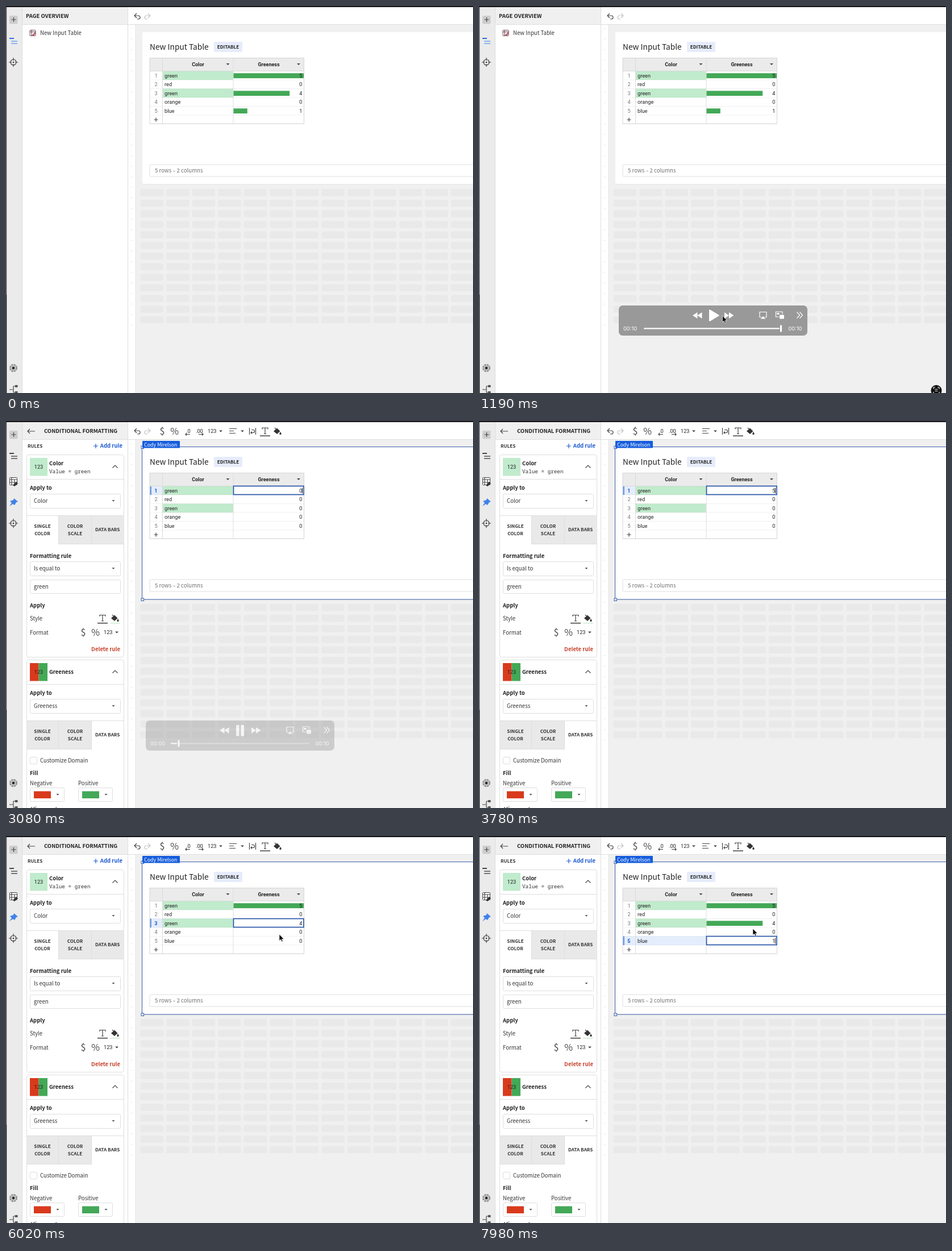
Recreate the animation shown at these times as an HTML page. Size 822 by 681 pixels, loop 8 s.

```html
<!DOCTYPE html>
<html lang="en">
<head>
<meta charset="utf-8">
<title>Conditional formatting</title>
<style>
html, body { margin: 0; width: 100%; height: 100%; overflow: hidden; background: #f0f0f0; }
svg { display: block; width: 822px; height: 681px; }
text { font: 9.65px "Noto Sans CJK JP", "Noto Sans CJK SC", "Noto Sans CJK", sans-serif; fill: #333; white-space: pre; }
.b { font-weight: 700; font-size: 9.5px; fill: #222; }
.s { font-weight: 700; font-size: 8.15px; }
.m { text-anchor: middle; }
.e { text-anchor: end; }
.title { font-size: 13.7px; fill: #222; }
.cell { font: 9.2px Roboto, sans-serif; fill: #222; }
.head { font: 700 9px Roboto, sans-serif; fill: #222; text-anchor: middle; }
.mono { font: 9.3px "Noto Sans Mono", monospace; }
.time { font: 9.3px Inter, sans-serif; fill: #fff; }
.sign { font: 16px "Noto Sans CJK JP", "Noto Sans CJK", sans-serif; fill: #444; text-anchor: middle; }
.ln { fill: none; stroke: #444; stroke-width: 1.2; }
</style>
</head>
<body>
<svg id="stage" viewBox="0 0 822 681"></svg>
<script>
const GREEN = '#43a857', PALE = '#c0ebcc', BLUE = '#1f5bd0', RED = '#d93a1c', LINE = '#dedede';
const LOOP = 8000, STEP = 70, PLAY = 2590;

const text = (x, y, s, cls = '', more = '') => `<text x="${x}" y="${y}" class="${cls}" ${more}>${s}</text>`;
const rect = (x, y, w, h, fill, more = '') => `<rect x="${x}" y="${y}" width="${w}" height="${h}" fill="${fill}" ${more}/>`;
const box = (x, y, w, h, r = 1.5, stroke = LINE) => rect(x + .5, y + .5, w, h, '#fff', `rx="${r}" stroke="${stroke}"`);
const line = (d, more = '') => `<path class="ln" d="${d}" ${more}/>`;
const fill = (d, color = '#444') => `<path d="${d}" fill="${color}"/>`;
const caret = (x, y, r = 3) => fill(`M${x - r} ${y - r / 2}h${2 * r}l${-r} ${r}z`);
const group = (id, body) => `<g id="${id}">${body}</g>`;
const repeat = (n, f) => Array.from({ length: n }, (_, i) => f(i)).join('');

const target = y => `<circle cx="13" cy="${y}" r="5" class="ln"/><circle cx="13" cy="${y}" r="1.3" fill="#333"/>` +
  line(`M13 ${y - 8}v5M13 ${y + 3}v5M5 ${y}h5M16 ${y}h5`);
const bucket = (x, y) => fill(`M${x - 6} ${y}l6-5.5 5.5 5.5-5.5 5z`, '#333') + line(`M${x - 4} ${y - 6}l4 4`) +
  fill(`M${x + 6} ${y + 1}q3.5 5 0 5t0-5`, '#333');
const letterT = (x, y) => line(`M${x - 5} ${y - 3}v-2.5h10v2.5M${x} ${y - 5.5}v10.5M${x - 2} ${y + 5}h4`) +
  rect(x - 9, y + 8, 18, 1.3, '#222');
const bars = color => fill('M6 56h8v2h-8z', color[0]) + fill('M9 61h11v2h-11zM9 65h11v2h-11z', color[1]);

function frame() {
  return rect(0, 0, 822, 681, '#f0f0f0') +
    rect(0, 33, 228, 648, '#fff') + rect(0, 2, 28, 679, '#ebebeb') + rect(28, 2, 186, 30, '#f0f0f0') +
    rect(215, 2, 607, 30, '#fff') + rect(28, 32, 794, 1, LINE) + rect(28, 2, 1, 679, LINE) +
    rect(214, 2, 1, 679, LINE) + rect(227.5, 33, 1, 648, '#e4e4e4') +
    repeat(29, i => rect(220.5, 39 + i * 18.65, 1.2, 1.2, '#ccc')) +
    repeat(13, r => repeat(13, c => rect(236.5 + c * 45.55, 322 + r * 18.65, 40.5, 12.5, '#e9e9e9', 'rx="3"'))) +
    rect(0, 0, 822, 2, '#17151a') + rect(0, 2, 1.2, 506, '#55525a') + rect(0, 508, 1.2, 173, '#111') +
    rect(6, 17, 14.5, 14.5, '#cdcdcd', 'rx="2"') + line('M9.5 24h8M13.5 20v8') +
    `<circle cx="13" cy="637" r="5.5" fill="none" stroke="#8a8a8a" stroke-width="3" stroke-dasharray="3.2 1.12"/>
     <circle cx="13" cy="637" r="5" fill="#bbb"/><circle cx="13" cy="637" r="2.2" fill="#222"/>` +
    line('M6 675h6M13 669v11M13 669h4M13 680h4') + rect(16, 667, 4.5, 4, '#555') + rect(16, 678, 4.5, 4, '#555') +
    line('M230 13l-4 4 4 4M226.5 17h6.5a3 3 0 0 1 0 6h-2') +
    line('M250 13l4 4-4 4M253.5 17h-6.5a3 3 0 0 0 0 6h2', 'style="stroke:#c4c4c4"');
}

function overview() {
  return text(35, 20.7, 'PAGE OVERVIEW', 'b') + bars(['#2f6fd8', '#8fb4f0']) + target(99) +
    box(41.5, 42, 10, 10, 1, '#6d4a55') + line('M42 45.5h11M45 42v11', 'style="stroke:#6d4a55"') +
    fill('M46 51l5-5 2 2-5 5h-2z', '#b0606c') + text(60, 51.2, 'New Input Table');
}

function select(x, y, w, label) {
  return box(x, y, w, 25, 2) + text(x + 7, y + 16, label) + caret(x + w - 12, y + 12.5, 2.6);
}

// Part shared by both rule cards; y is the card's top edge.
function rule(y, h, name, titleY, active) {
  const gray = active ? [36.5, 114.5] : [92, 115.5];
  return box(36, y, 171, h, 3) + text(76, y + titleY, name, 'b') +
    line(`M187.5 ${y + 23.5}l4.5-4.5 4.5 4.5`) + rect(36, y + 43, 171, 1, LINE) +
    text(42, y + 62, 'Apply to', 'b') + select(42, y + 69, 159, name) +
    rect(gray[0], y + 107, gray[1], 50, '#e9e9e9') +
    rect(36, y + 107, 171, 1, LINE) + rect(gray[0], y + 157, gray[1], 1, LINE) +
    rect(92, y + 107, 1, 50, LINE) + rect(150, y + 107, 1, 50, LINE) +
    text(64, y + 129, 'SINGLE', 's m') + text(64, y + 141.5, 'COLOR', 's m') +
    text(121.5, y + 129, 'COLOR', 's m') + text(121.5, y + 141.5, 'SCALE', 's m') +
    text(178.7, y + 135.3, 'DATA BARS', 's m');
}

function formatting() {
  const picker = (x, label, color) => text(x, 640.5, label) + box(x, 645, 60, 24, 2) +
    rect(x + 7, 651.5, 30, 12.5, color) + caret(x + 49, 657.5, 2.6);
  return line('M51 18h-13M42 14l-4 4 4 4') + text(67, 20.9, 'CONDITIONAL FORMATTING', 'b') +
    bars(['#444', '#777']) + target(180) +
    box(6, 99, 13, 13, 1, '#444') + line('M6 103h14M10 99v14M15 103v10M6 108h14') + fill('M12 113l6-6 3 3-6 5z', '#333') +
    fill('M14 136l7 6-3 1-3 5-3-2-6 4 4-6-3-3 6-2z', '#3f83e8') +
    text(38, 47.3, 'RULES', 's') + line('M154 44h8M158 40v8', `style="stroke:${BLUE}"`) +
    text(205, 47.4, 'Add rule', 'b e', `style="fill:${BLUE}"`) +
    rule(59, 356, 'Color', 18.7, 0) + rect(42, 65, 31, 31.5, PALE) + text(57.5, 84, '123', 'cell m') +
    text(76, 91.7, 'Value = green', 'mono') +
    text(42, 240.7, 'Formatting rule', 'b') + select(42, 247, 159, 'Is equal to') +
    box(42, 279, 159, 24, 2) + text(49, 295, 'green') +
    text(42, 327.7, 'Apply', 'b') + text(42, 351, 'Style') + text(42, 375.5, 'Format') +
    letterT(170, 347) + bucket(191, 347) + rect(183, 355, 18, 1.3, PALE) +
    text(136, 377.5, '$', 'sign') + text(157.5, 377.5, '%', 'sign') + text(172, 375.3, '123', 'cell') + caret(195, 372) +
    text(201, 404.7, 'Delete rule', 'b e', 'style="fill:#c5442f"') +
    rule(420, 290, 'Greeness', 24.7, 1) + rect(42, 426, 15.5, 31.5, RED) + rect(57.5, 426, 15.5, 31.5, GREEN) +
    text(57.5, 444.5, '123', 'cell m') +
    box(42, 591, 12, 12) + text(60, 601, 'Customize Domain') + text(42, 622.7, 'Fill', 'b') +
    picker(42, 'Negative', RED) + picker(127, 'Positive', GREEN) + text(42, 687, 'Alignment', 'b') +
    toolbar();
}

function toolbar() {
  return text(275, 23.5, '$', 'sign') + text(296.5, 23.5, '%', 'sign') +
    text(317, 20.5, '.0', 'cell') + line('M324 23.5h-8m2-2l-2 2 2 2', 'stroke-width="1"') +
    text(334, 20.5, '.00', 'cell') + line('M339 23.5h8m-2-2l2 2-2 2') +
    text(355, 21.3, '123', 'cell') + caret(378, 18) + line('M393 13.5h13M393 17.5h8M393 21.5h11') + caret(416, 18) +
    line('M428.5 12v12M439.5 12v12M431 20.5h4a2.5 2.5 0 0 0 0-5h-3M433 18.5l-2 2 2 2') +
    letterT(456, 17.5) + bucket(477, 18);
}

function card() {
  return rect(240, 46, 600, 267, '#fff', 'rx="3"') + rect(239.5, 313, 600, 1, '#e6e6e6') +
    text(253, 77, 'New Input Table', 'title') + rect(366, 63, 50, 18, '#e6ecfb', 'rx="1.5"') +
    text(391, 75.3, 'EDITABLE', 's m', 'style="fill:#222"') +
    box(252.5, 278.5, 600, 21) + text(262, 293, '5 rows – 2 columns', '', 'style="fill:#707070"');
}

function outline() {
  const knob = y => box(237.5, y, 4.5, 4.5, 0, '#3a5ea8');
  return rect(239.5, 45.5, 600, 268.5, 'none', 'stroke="#3a5ea8"') + knob(43.5) + knob(311.5) +
    rect(240, 35, 66, 12.5, '#155ddd', 'rx="1"') +
    text(243, 44.8, 'Cody Mirelson', '', 'style="fill:#fff;font-size:8.9px"');
}

function table({ values, row: sel, edit, beam }) {
  const top = i => 114.5 + i * 15.5;
  const rows = ['green', 'red', 'green', 'orange', 'blue'].map((name, i) => {
    const y = top(i), on = i === sel, bar = on && edit ? 0 : values[i] / 5 * 124;
    return (on ? rect(253, y, 147, 15.5, '#e4edfc') + rect(253, y, 3, 15.5, '#6d9ae8') : '') +
      (name === 'green' ? rect(276, y, 124, 15.5, PALE) : '') +
      text(264, y + 11.2, i + 1, 'cell m', `style="fill:${on ? BLUE : '#777'};${on ? 'font-weight:700' : ''}"`) +
      text(279, y + 11.2, name, 'cell') + rect(400, y + 3.8, bar, 8.8, GREEN) +
      text(521.5, y + 11.2, values[i], 'cell e');
  }).join('');
  const y = top(sel);
  const focus = sel < 0 ? '' : rect(400.5, y, 123.5, 15, 'none', `stroke="#2a56a8" stroke-width="${edit ? 1.7 : 1.1}"`) +
    (edit ? '' : `<circle cx="524" cy="${y + 15.5}" r="3" fill="#155ddd"/>`) +
    (beam ? rect(521, y + 3, 1, 10, '#222') : '');
  return rect(253, 92, 271, 22.5, '#ebebeb') + rows +
    repeat(6, i => rect(253, top(i + 1) - .5, 271, 1, '#000', 'opacity=".06"')) +
    rect(275, 92, 1, 115, '#dadada') + rect(399.5, 92, 1, 115, '#dedede') + rect(253, 114, 271, 1, '#dadada') +
    rect(253, 91.5, 271.5, 115.5, 'none', 'stroke="#d6d6d6"') +
    text(338, 105.6, 'Color', 'head') + text(462.5, 105.6, 'Greeness', 'head') + caret(390.5, 102.5) + caret(515, 102.5) +
    line('M260.5 200h7M264 196.5v7') + focus;
}

function player() {
  const skip = (x, d) => fill(`M${x} 539v11l${8 * d}-5.5zM${x + 8 * d} 539v11l${8.5 * d}-5.5z`, '#fff');
  const white = 'style="stroke:#fff"';
  return rect(246, 527, 332, 53, '#999', 'rx="7"') + skip(392.5, -1) + skip(432, 1) +
    group('play', fill('M405 535.5q0-2 2-1l15 9q1.5 1 0 2l-15 9q-2 1-2-1z', '#fff')) +
    group('pause', rect(405, 535, 5.5, 19.5, '#fff', 'rx="1"') + rect(413.5, 535, 5.5, 19.5, '#fff', 'rx="1"')) +
    line('M497 547.5h-3v-9h12v9h-3', white) + fill('M495.5 550.5h9l-4.5-4.5z', '#fff') +
    line('M528 547h-5.5v-9h11.500v4', white) + rect(524.5, 540, 4, 3, '#fff') + rect(529, 543.5, 8, 7, '#fff', 'rx="1"') +
    line('M559.500 538.500l5 5.500-5 5.500M564.500 538.500l5 5.500-5 5.500', white) +
    text(254, 570.7, '00:10', 'time', 'id="elapsed"') + text(544.5, 570.7, '00:10', 'time') +
    rect(290, 566.5, 244, 2, '#fff', 'rx="1" opacity=".4"') + rect(290, 566.5, 0, 2, '#fff', 'rx="1" id="played"') +
    rect(-1.5, 561.5, 3, 12, '#fff', 'rx="1" id="thumb"');
}

const badge = '<circle cx="805" cy="676.5" r="9.5" fill="#111"/>' +
  line('M800 674v-3h3M807 671h3v3M800 679v3h3M807 682h3v-3M802.500 674.500h5M802.500 677.500h5', 'style="stroke:#eee"');
const arrow = '<path d="M0 0v11.500l2.600-2.400 1.800 4 1.900-.8-1.800-3.900h3.600z" fill="#000" stroke="#fff" stroke-width=".7"/>';

document.getElementById('stage').innerHTML = frame() + card() + group('overview', overview()) +
  group('formatting', formatting() + outline()) + group('table', '') +
  group('player', player()) + group('badge', badge) + group('cursor', arrow);

const el = id => document.getElementById(id);
const show = (id, on) => el(id).setAttribute('display', on ? 'inline' : 'none');

// Linear interpolation between [time, ...values] keys.
function track(keys, t) {
  const i = keys.findIndex(k => k[0] > t);
  if (i < 0) return keys.at(-1).slice(1);
  if (i === 0) return keys[0].slice(1);
  const a = keys[i - 1], b = keys[i], p = (t - a[0]) / (b[0] - a[0]);
  return a.slice(1).map((v, n) => v + (b[n + 1] - v) * p);
}

const playerFade = [[910, 0], [1190, 1], [2940, 1], [3080, .4], [3150, 0]];
const badgeFade = [[910, 0], [1190, 1], [2450, 1], [2520, .72], [2660, 0]];
const path = [
  [910, 434, 552], [1190, 428.5, 545], [1890, 428.5, 545], [2380, 414, 543], [3800, 414, 543],
  [3801, 490, 178], [4270, 494, 146], [5880, 494, 146], [6020, 481, 173], [6230, 478, 182],
  [6720, 478, 182], [6860, 482, 163]
];

function tableState(t) {
  if (t < PLAY) return { values: [5, 0, 4, 0, 1], row: -1 };
  const row = t < 4340 ? 0 : t < 6300 ? 2 : 4;
  const edit = row === 0 || (row === 2 && t >= 5040) || (row === 4 && t >= 7070);
  return {
    values: [t < 3430 ? 0 : 5, 0, t < 5250 ? 0 : 4, 0, t < 7140 ? 0 : 1],
    row, edit, beam: edit && !(row === 2 && t >= 5810)
  };
}

let last = '';
function draw(now) {
  const t = Math.floor(now % LOOP / STEP) * STEP, playing = t >= PLAY;
  const state = tableState(t), key = JSON.stringify(state);
  if (key !== last) el('table').innerHTML = table(state);
  last = key;

  show('overview', !playing);
  show('formatting', playing);
  show('play', !playing);
  show('pause', playing);
  el('player').setAttribute('opacity', track(playerFade, t)[0]);
  el('badge').setAttribute('opacity', track(badgeFade, t)[0]);
  el('elapsed').textContent = playing ? '00:00' : '00:10';
  const x = playing ? 291 + (t - 2540) * .024 : 531.5;
  el('thumb').setAttribute('transform', `translate(${x})`);
  el('played').setAttribute('width', Math.max(0, x - 293));

  show('cursor', (t >= 980 && t < 2800) || t >= 3850);
  el('cursor').setAttribute('transform', `translate(${track(path, t)})`);
}

const start = performance.now();
(function tick() {
  draw(performance.now() - start);
  requestAnimationFrame(tick);
})();
</script>
</body>
</html>
```
